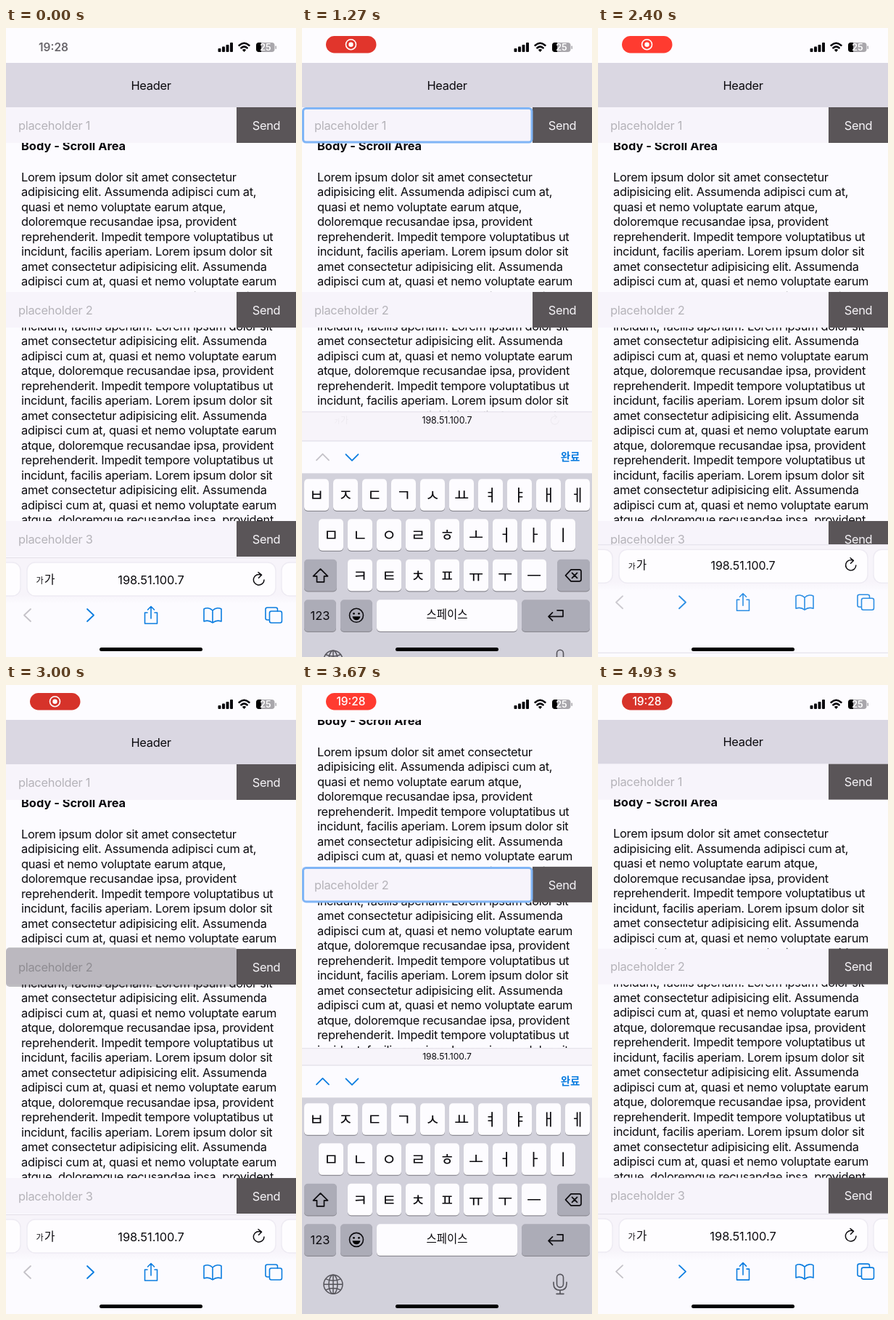
These frames come from a looping animation (400 by 865 pixels, 4.99 s). An HTML page:

```html
<!DOCTYPE html>
<html lang="en">
<head>
<meta charset="utf-8">
<style>
  html, body { margin: 0; width: 100%; height: 100%; overflow: hidden; background: #fcfbff; }
  svg { display: block; width: 400px; height: 865px; }
  text { font-family: Inter, "Noto Sans CJK KR", "Noto Sans CJK", sans-serif; font-size: 16.4px; letter-spacing: -.28px; }
  .mid { text-anchor: middle; }
  .ko { font-family: "Noto Sans CJK KR", "Noto Sans CJK", sans-serif; letter-spacing: 0; }
  .line { fill: none; stroke-linecap: round; stroke-linejoin: round; }
</style>
</head>
<body>
<svg id="stage" viewBox="0 0 400 865" xmlns="http://www.w3.org/2000/svg"></svg>
<script>
const LOOP = 4990;
const PAPER = '#fcfbff', HEAD = '#dad7e2', FIELD = '#f7f4fb', DARK = '#5a5558', HAZE = '#f7f4fa';
const BLUE = '#0b7de0', FAINT = '#c4c2c8', HAIR = '#e2dfe8', INK = '#0b0a0e';

const rect = (x, y, w, h, fill, r = 0, more = '') =>
  `<rect x="${x}" y="${y}" width="${w}" height="${h}" rx="${r}" fill="${fill}" ${more}/>`;
const text = (x, y, s, fill = INK, more = '') => `<text x="${x}" y="${y}" fill="${fill}" ${more}>${s}</text>`;
const label = (x, y, s, fill, style = '', cls = '') => text(x, y, s, fill, `class="mid ${cls}" style="${style}"`);
const line = (d, color, width = 1.6, more = '') =>
  `<path class="line" d="${d}" stroke="${color}" stroke-width="${width}" ${more}/>`;
const group = (id, body) => `<g id="${id}">${body}</g>`;

const opening = [
  'Lorem ipsum dolor sit amet consectetur',
  'adipisicing elit. Assumenda adipisci cum at,',
  'quasi et nemo voluptate earum atque,',
  'doloremque recusandae ipsa, provident',
];
const refrain = [
  'reprehenderit. Impedit tempore voluptatibus ut',
  'incidunt, facilis aperiam. Lorem ipsum dolor sit',
  'amet consectetur adipisicing elit. Assumenda',
  'adipisci cum at, quasi et nemo voluptate earum',
  'atque, doloremque recusandae ipsa, provident',
];

function paragraph() {
  return Array.from({ length: 25 }, (_, i) =>
    text(21, 210.8 + i * 20.5, i < 4 ? opening[i] : refrain[(i - 4) % 5])).join('');
}

function field(n, y) {
  return rect(0, y, 318, 49, FIELD) + rect(318, y, 82, 49, DARK) +
    text(17, y + 30.8, 'placeholder ' + n, '#b5b3b9') +
    label(359, y + 30.8, 'Send', '#f6f4f8') +
    rect(0, y - 2, 319, 54, 'rgba(60,56,62,.32)', 5, `id="tap${n}"`) +
    group('focus' + n,
      rect(1.5, y + 1.5, 315.5, 46.5, 'none', 4, 'stroke="#80b5f6" stroke-width="3"') +
      rect(16.5, y + 15, 2, 20, '#3f80e0', 1, `id="caret${n}"`));
}

function page() {
  return group('page',
    rect(0, 48, 400, 61, HEAD) + label(200, 84.8, 'Header') +
    text(21, 167.8, 'Body - Scroll Area', INK, 'style="font-weight:700;letter-spacing:0"') +
    paragraph() + field(1, 109) + field(2, 363) + field(3, 678));
}

function browserBar() {
  const pill = (x, w) => rect(x, 7, w, 46, '#fefdff', 11, 'stroke="#eeebf3" stroke-width="1.5"');
  const tools =
    line('M34 71 L25 79.5 L34 88', FAINT, 1.8) + line('M112 71 L121 79.5 L112 88', BLUE, 1.8) +
    line('M195 76 H191.5 V91 H208.5 V76 H205 M200 84 V67.5 M195.5 72 L200 67.5 L204.5 72', BLUE) +
    line('M285 73 C281 69 276 69 273 71 V88 C277 86.5 281 86.5 285 90 C289 86.5 293 86.5 297 88 V71 C294 69 289 69 285 73 V90', BLUE) +
    line('M363 86 H360.5 Q358 86 358 83.5 V71.5 Q358 69 360.5 69 H372 Q374.5 69 374.5 71.5 V74', BLUE) +
    rect(363.5, 74, 17, 16, 'none', 2.5, `stroke="${BLUE}" stroke-width="1.6"`);
  return group('bar',
    rect(0, 0, 400, 400, PAPER) + rect(0, 0, 400, 64, 'url(#haze)') +
    line('M0 .5 H400', HAIR, 1) +
    group('pills', pill(-20, 40) + pill(29, 343) + pill(380, 40)) +
    group('tools', tools) +
    group('address',
      group('textSize',
        label(-7.5, 5, '가', INK, 'font-size:11px', 'ko') + label(6, 5, '가', INK, 'font-size:16px', 'ko')) +
      group('reload', line('M3 -6.8 A7.3 7.3 0 1 0 7 0 M-1 -10.5 L3.5 -6.8 L-.5 -2.8', INK, 1.5)) +
      group('host', label(0, 5.8, '198.51.100.7', INK, 'letter-spacing:0'))));
}

function key(x, y, w, fill = '#fdfcff') {
  return rect(x, y + 1.2, w, 43.5, '#8d8c94', 5) + rect(x, y, w, 43.5, fill, 5);
}

function keyRow(letters, firstX, y) {
  return [...letters].map((c, i) => key(firstX + i * 40 - 17, y, 34) +
    label(firstX + i * 40, y + 30, c, INK, 'font-size:22px', 'ko')).join('');
}

function keyboard() {
  const grey = '#acacb7', mute = '#55545b';
  const face = `<circle cx="75" cy="762.5" r="9.5" fill="none" stroke="${INK}" stroke-width="1.6"/>` +
    '<circle cx="71.5" cy="760" r="1.4"/><circle cx="78.5" cy="760" r="1.4"/>' +
    '<path d="M69.5 764 H80.5 Q79.5 769 75 769 Q70.5 769 69.5 764Z"/>';
  const globe = `<g fill="none" stroke="${mute}" stroke-width="1.5"><circle cx="43" cy="824" r="13"/>` +
    '<ellipse cx="43" cy="824" rx="6" ry="13"/><path d="M30 824 H56 M43 811 V837 M33 816.5 Q43 821 53 816.5 M33 831.5 Q43 827 53 831.5"/></g>';
  const mic = rect(351.5, 810, 9, 18, 'none', 4.5, `stroke="${mute}" stroke-width="1.6"`) +
    line('M347 821 V823 Q347 832 356 832 Q365 832 365 823 V821 M356 832 V837 M351 837 H361', mute);
  return group('keyboard',
    rect(0, 523, 400, 400, '#d2d1db') + rect(0, 523, 400, 44, PAPER) +
    line('M0 522.5 H400', HAIR, 1) +
    line('M20 549 L28.5 540.5 L37 549', FAINT, 1.8, 'id="up"') +
    line('M60.5 541 L69 549.5 L77.5 541', BLUE, 1.8) +
    label(370, 550, '완료', BLUE, 'font-size:14.5px;font-weight:700', 'ko') +
    keyRow('ㅂㅈㄷㄱㅅㅛㅕㅑㅐㅔ', 20, 575) +
    keyRow('ㅁㄴㅇㄹㅎㅗㅓㅏㅣ', 40, 630) +
    keyRow('ㅋㅌㅊㅍㅠㅜㅡ', 80, 685.5) +
    key(3, 685.5, 45, grey) + key(352, 685.5, 45, grey) +
    key(3, 741, 44, grey) + key(53, 741, 44, grey) + key(103, 741, 194) + key(303, 741, 94, grey) +
    line('M25.5 698.5 L35.5 708.5 H30.5 V716.5 H20.5 V708.5 H15.5Z', INK, 1.7) +
    line('M371 699.5 H382.5 Q385 699.5 385 702 V713 Q385 715.5 382.5 715.5 H371 L363.5 707.5Z M372.5 704 L379.5 711 M379.5 704 L372.5 711', INK, 1.7) +
    label(25, 768.5, '123', INK, 'letter-spacing:0') + face +
    label(200, 767, '스페이스', INK, 'font-size:15.5px', 'ko') +
    line('M345.5 758.5 L340 764 L345.5 769.5 M340 764 H360 V755.5 H352', INK, 1.7) +
    globe + mic);
}

function statusBar() {
  const bars = [5, 7.5, 10, 13].map((h, i) => rect(292.5 + i * 5.5, 33 - h, 4, h, INK, 1)).join('');
  const wifi = line('M321.5 24 Q328.5 17.5 335.5 24', INK, 2.5) +
    line('M324.3 27.5 Q328.5 23.7 332.7 27.5', INK, 2.5) +
    '<path d="M325.8 30 Q328.5 27.8 331.2 30 L328.5 33Z"/>';
  const battery = rect(345, 20, 25.5, 13, '#a9a7ac', 4) +
    '<path d="M352 20 H349 Q345 20 345 24 V29 Q345 33 349 33 H352Z"/>' + rect(371.5, 24.5, 1.5, 4.5, '#a9a7ac', .7) +
    label(358, 31, '25', '#fff', 'font-size:12.5px;font-weight:600;letter-spacing:0');
  const clock = (x, y, fill, weight) => label(x, y, '19:28', fill, `letter-spacing:0;font-size:15.5px;font-weight:${weight}`);
  return rect(0, 0, 400, 48, '#fdfcff') + bars + wifi + battery +
    group('plainClock', clock(65.5, 32.3, '#69666b', 600)) +
    group('recording',
      rect(33, 11, 69.5, 23.5, '#d6332a', 11.7, 'id="capsule"') +
      group('dot', '<circle cx="67.5" cy="22.7" r="7" fill="none" stroke="#fff" stroke-width="1.6"/><circle cx="67.5" cy="22.7" r="3.2" fill="#fff"/>') +
      group('pillClock', clock(67.5, 28.3, '#fff', 500)));
}

const stage = document.getElementById('stage');
stage.innerHTML =
  `<defs><linearGradient id="haze" x2="0" y2="1"><stop offset="0" stop-color="${HAZE}"/><stop offset=".8" stop-color="${HAZE}"/><stop offset="1" stop-color="${PAPER}"/></linearGradient></defs>` +
  rect(0, 0, 400, 865, PAPER) + page() + browserBar() + keyboard() + statusBar() +
  rect(129, 852, 142, 5, '#000', 2.5);

const el = Object.fromEntries([...stage.querySelectorAll('[id]')].map(n => [n.id, n]));
const move = (n, x, y, s = 1) => n.setAttribute('transform', `translate(${x} ${y}) scale(${s})`);
const fade = (n, o) => n.setAttribute('opacity', o);
const ramp = (t, a, b) => Math.min(1, Math.max(0, (t - a) / (b - a)));
const within = (t, a, b) => t >= a && t < b ? 1 : 0;

const TAP1 = 850, OPEN1 = 1045, CLOSE1 = 2138, TAP2 = 2890, OPEN2 = 3092, CLOSE2 = 4450;

// Share of the critically damped keyboard spring still to travel.
function remaining(ms) {
  const x = Math.max(0, ms) * .016;
  return (1 + x) * Math.exp(-x);
}

function closedness(t) {
  if (t < CLOSE1) return remaining(t - OPEN1);
  if (t < TAP2) return 1 - remaining(t - CLOSE1);
  if (t < CLOSE2) return remaining(t - OPEN2);
  return 1 - remaining(t - CLOSE2);
}

function draw(t) {
  const q = closedness(t), second = t >= TAP2;

  move(el.page, 0, second ? -113.5 * (1 - q ** .82) : 0);
  move(el.keyboard, 0, 365 * q);
  move(el.bar, 0, 499 + 229 * q);
  move(el.address, 0, 11.5 + 19.5 * q ** 1.5);
  const size = .74 + .26 * q ** 1.3;
  move(el.host, 200, 0, size);
  move(el.textSize, 54, 0, size);
  move(el.reload, 349, 0, size);
  for (const icon of [el.textSize, el.reload]) fade(icon, ramp(q, .1, .7));
  fade(el.pills, ramp(q, .2, .8));
  fade(el.tools, q * q);
  el.up.setAttribute('stroke', second ? BLUE : FAINT);

  fade(el.tap1, within(t, TAP1, OPEN1));
  fade(el.tap2, within(t, TAP2, OPEN2));
  fade(el.tap3, 0);
  fade(el.focus1, within(t, OPEN1, CLOSE1));
  fade(el.focus2, within(t, OPEN2, CLOSE2));
  fade(el.focus3, 0);
  fade(el.caret1, within(t, 1580, CLOSE1));
  fade(el.caret2, within(t, 3720, 4250));

  const shown = ramp(t, 40, 300), clock = ramp(t, 3130, 3340);
  fade(el.plainClock, 1 - shown);
  fade(el.recording, shown);
  fade(el.dot, 1 - clock);
  fade(el.pillClock, clock);
  const glow = Math.min(1, (1 - Math.cos((t - 1000) * Math.PI / 1000)) / 1.3);
  el.capsule.setAttribute('fill', `rgb(${214 + 41 * glow},${51 + 8 * glow},${42 + 6 * glow})`);
}

const start = performance.now();
function tick() {
  draw((performance.now() - start) % LOOP);
  requestAnimationFrame(tick);
}
tick();
</script>
</body>
</html>
```
